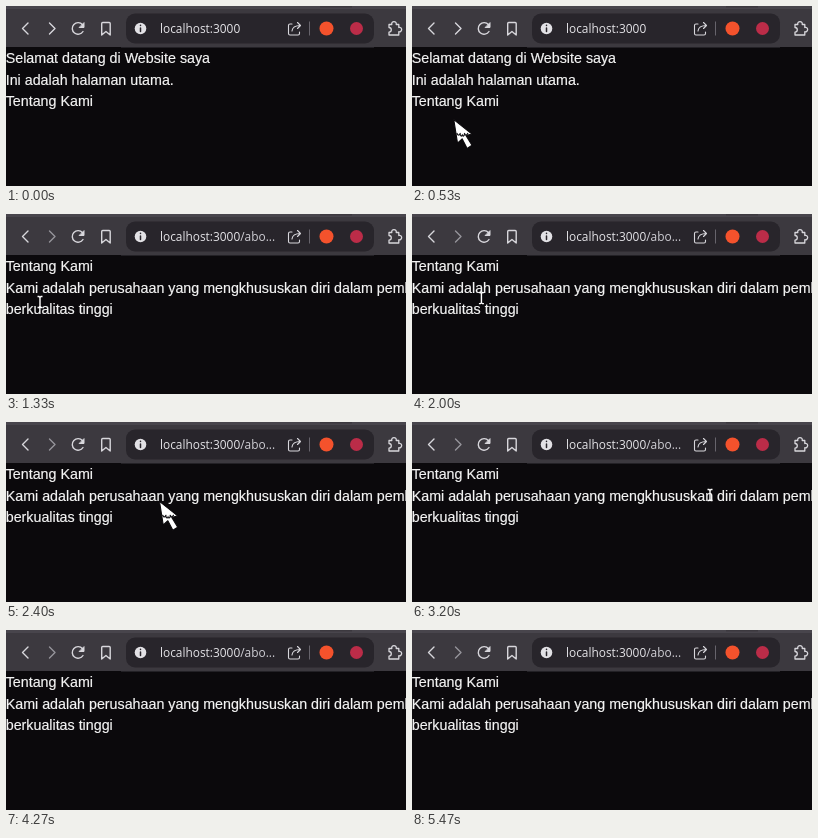
Write an HTML page that moves like this. It is 400x180 px and loops after 5540 ms.

```html
<!DOCTYPE html>
<html lang="id">
<head>
<meta charset="utf-8">
<title>Tentang Kami</title>
<style>
  html, body { margin: 0; width: 100%; height: 100%; overflow: hidden; background: #0b090c; }
  svg { display: block; width: 400px; height: 180px; }
  .page { font: 14.27px "Liberation Sans", Arial, sans-serif; fill: #f4f4f4; stroke: #f4f4f4; stroke-width: .2; }
  .url { font: 11.9px "Open Sans", "Noto Sans", sans-serif; fill: #e4e3e7; }
  .path { fill: #cfced4; }
  .line { fill: none; stroke: #d8d7dc; stroke-width: 1.4; stroke-linecap: round; stroke-linejoin: round; }
  .solid { fill: #fff; stroke: #0b090c; stroke-width: 1; stroke-linejoin: round; }
  .face { fill: none; stroke: #17161a; stroke-width: 1.2; stroke-linecap: round; }
  [hidden] { display: none; }
</style>
</head>
<body>
<svg viewBox="0 0 400 180">
  <rect width="400" height="180" fill="#0b090c"/>

  <!-- toolbar -->
  <rect width="400" height="41" fill="#3c393f"/>
  <path d="M0 0h314v1.500h32V0h54v3H0z" fill="#48454c"/>
  <path d="M115 41.500h253" stroke="#232126"/>
  <rect x="120" y="7.500" width="248" height="30" rx="9" fill="#28252b"/>
  <g class="line">
    <path d="M22 17l-5.500 5.500 5.500 5.500"/>
    <path id="forward" d="M43.500 17l5.500 5.500-5.500 5.500"/>
    <path d="M76.500 18.700A5.800 5.800 0 1 0 77 25.500"/>
    <path d="M78 17v4.500h-4.500z" fill="#d8d7dc" stroke-width="1"/>
    <path d="M95.700 17.500q0-1 1-1h6.500q1 0 1 1v11.500l-4.250-3.500-4.250 3.500z"/>
    <g stroke-width="1.1">
      <path d="M286 18h-2q-1.500 0-1.500 1.500v8q0 1.500 1.500 1.500h8q1.500 0 1.500-1.500v-1.500"/>
      <path d="M286 25q.5-5.500 8.500-5.500M291.500 16.500l3 3-3 3"/>
    </g>
    <path d="M383 18.500h2.800a2.300 2.300 0 1 1 4.400 0h2.600v3a2.200 2.200 0 1 1 0 4.200v3.300h-9.800v-2.900a2.300 2.300 0 0 0 0-4.600z" stroke-width="1.3"/>
  </g>
  <circle cx="134.500" cy="22.500" r="5.800" fill="#e2e1e5"/>
  <path d="M134.500 22v3.500M134.500 19.300v.2" stroke="#28252b" stroke-width="1.5" stroke-linecap="round"/>
  <path d="M303.500 15.500v14" stroke="#67646c"/>
  <circle cx="320.500" cy="22.500" r="7" fill="#f4522c"/>
  <circle cx="350.500" cy="22.500" r="6.500" fill="#bb2c48"/>
  <text class="url" x="154" y="27">localhost:3000<tspan id="route" class="path">/abo...</tspan></text>

  <g id="home" class="page">
    <text x="-.3" y="57">Selamat datang di Website saya</text>
    <text x="-.3" y="78.600">Ini adalah halaman utama.</text>
    <text x="-.3" y="100.200">Tentang Kami</text>
  </g>
  <g id="about" class="page">
    <text x="-.3" y="57">Tentang Kami</text>
    <text x="-.3" y="78.600">Kami adalah perusahaan yang mengkhususkan diri dalam pembuatan</text>
    <text x="-.3" y="100.200">berkualitas tinggi</text>
  </g>

  <!-- pointers, each with its hot spot at 0,0 -->
  <g id="pointer">
    <g id="arrow" transform="translate(-.5 -1.5) scale(1.07)">
      <path class="solid" d="M0-1L17 12.500 11.500 14 17 23 12.500 26 7.800 17 3.500 21z"/>
      <path class="face" d="M3 12q1.500 3 3 0M6 13q1 2.500 2 .5 1 2 2-.5M10 12q1.500 3 3 0"/>
    </g>
    <g id="hand">
      <path class="solid" d="M-1.500 2C-2-2 4-3 5 1L6.500 7Q10 5.500 11.500 8 14.500 7 15.500 10 18 10 18 13.500 19 20 14.500 23.500L14 25 4 26 2.500 23Q-3 20-6.500 14.500C-8 11-4 9.500-2 12L.5 14z"/>
      <path class="face" d="M1 16q2 4 4 0 0-3-2-3t-2 3M6 18q1.200 2 2.400 0 1.200 2 2.400 0M11.500 16q2 4 4 0 0-3-2-3t-2 3"/>
    </g>
    <path id="beam" d="M-2.500-5.500h1.500l1 1 1-1h1.500M0-4.500v9M-2.500 5.500h1.500l1-1 1 1h1.500" fill="none" stroke="#fff" stroke-width="1.4"/>
  </g>
</svg>
<script>
  const LOOP = 5540, STEP = 200 / 3, CLICK = 1260, ENTER = 65, LEAVE = 4060;
  // pointer stops: time, x, y
  const stops = [
    [60, 77, 152], [330, 66, 139], [600, 38, 112], [730, 27, 96], [870, 34, 88],
    [1850, 34, 88], [2130, 98, 81], [2390, 154, 82], [2560, 154, 82],
    [2950, 298, 73], [3230, 298, 73], [3590, 291, 154], [4060, 286, 178]
  ];
  const el = id => document.getElementById(id);
  const show = (id, on) => el(id).toggleAttribute("hidden", !on);

  function position(t) {
    const i = Math.max(1, stops.findIndex(s => s[0] >= t));
    const [a, b] = [stops[i - 1], stops[i]];
    const k = (t - a[0]) / (b[0] - a[0]);
    const e = k * k * (3 - 2 * k);
    return [a[1] + (b[1] - a[1]) * e, a[2] + (b[2] - a[2]) * e];
  }

  function kind(x, y, about) {
    if (!about) return x < 87 && y > 85 && y < 106 ? "hand" : "arrow";
    const onText = (y > 63 && y < 81.5) || (y <= 106 && y > 81.5 && x < 106);
    return onText ? "beam" : "arrow";
  }

  function draw(now) {
    const t = Math.floor((now % LOOP + 5) / STEP) * STEP;
    const about = t >= CLICK;
    show("home", !about);
    show("about", about);
    show("route", about);
    el("forward").style.stroke = about ? "#96949b" : "";

    const inside = t >= ENTER && t < LEAVE;
    show("pointer", inside);
    if (inside) {
      const [x, y] = position(t);
      const shape = kind(x, y, about);
      for (const id of ["arrow", "hand", "beam"]) show(id, id === shape);
      el("pointer").setAttribute("transform", `translate(${x} ${y})`);
    }
  }

  const start = performance.now();
  function tick() {
    draw(performance.now() - start);
    requestAnimationFrame(tick);
  }
  tick();
</script>
</body>
</html>
```
